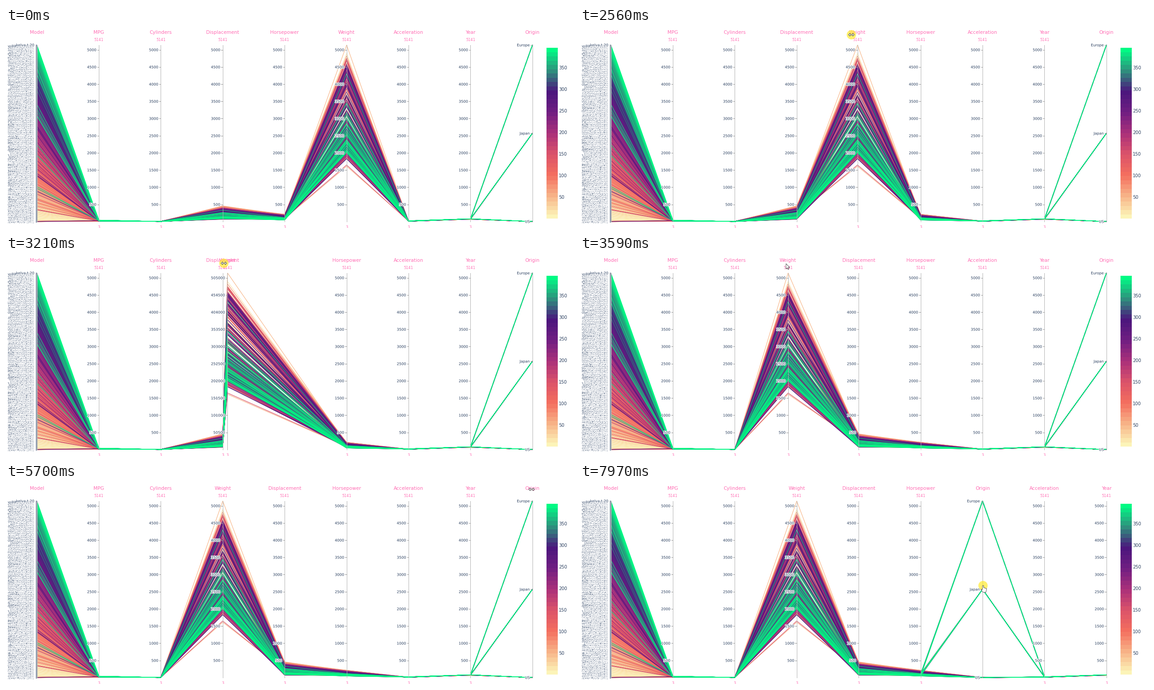
A matplotlib script for the animation above (8000 ms loop, 1260 by 445 pixels).

```python
import numpy as np
import matplotlib.pyplot as plt
from matplotlib.animation import FuncAnimation
from matplotlib.collections import LineCollection
from matplotlib.colors import LinearSegmentedColormap
from matplotlib.patches import Circle, Polygon, Rectangle
from matplotlib.patheffects import withStroke

W, H, DPI = 1260, 445, 100
PX = 72 / DPI
FRAMES, STEP = 200, 40
ROWS, MODELS = 392, 304
LOW, HIGH = 3, 5141
TOP, BOTTOM = 37.8, 430.6
SLOTS = 68.6 + 137.4 * np.arange(9)
NAMES = ["Model", "MPG", "Cylinders", "Displacement", "Horsepower",
         "Weight", "Acceleration", "Year", "Origin"]
FIXED = 3  # the first axes never move
ORIGINS = ["US", "Japan", "Europe"]
PINK, INK, GREY = "#ff6eb4", "#2a3f5f", "#b2b2b2"
CMAP = LinearSegmentedColormap.from_list("sunset", [
    "#fcf4b8", "#f7b287", "#f46e5e", "#da526a", "#aa307a",
    "#701e82", "#4b167d", "#2f8f7d", "#00fa84"], N=512)

# Cursor moves: start time, end time, x, y reached
START = 1214, 447
MOVES = [(100, 500, 880, 335), (500, 910, 764, 36), (1060, 1540, 751, 13),
         (2040, 2080, 733, 17), (2080, 2560, 602, 15), (2560, 2880, 517, 15),
         (2880, 3450, 457, 17), (3600, 4380, 702, 12), (4450, 5090, 1213, 37),
         (5200, 5400, 1166, 12), (5920, 6670, 877, 13), (7000, 7430, 882, 187),
         (7700, 7960, 894, 226)]
# Axis, pressed, released
DRAGS = [("Weight", 1850, 3560), ("Origin", 5920, 7000)]
LAG, SNAP = 33, 80  # an axis trails the cursor, then snaps into its slot

ARROW = np.array([(0, 0), (0, 12), (2.8, 9.4), (4.6, 13.2), (6.2, 12.4),
                  (4.5, 8.8), (8.2, 8.8)])
HEAD = np.array([(-3, 1), (-3, 3.2), (-6.5, 0), (-3, -3.2), (-3, -1)])
SIDEWAYS = np.vstack([HEAD, -HEAD])
HAND = np.array([(-1, 0), (1.3, 0), (1.5, 4.5), (8, 6.8), (6.5, 15), (0, 15),
                 (-4.8, 8), (-1.2, 9)])

rng = np.random.default_rng(8)


def y_of(value):
    return BOTTOM - (np.asarray(value) - LOW) * (BOTTOM - TOP) / (HIGH - LOW)


def make_car(u):
    """Values from MPG to Origin; cars get lighter as u goes from 0 to 1."""
    late = u > .77
    pick, origin = rng.random(), 0
    if pick < (.03 if late else .42):
        cyl = 8
        weight = np.clip(rng.normal(4150, 430), 3350, 5000 - 700 * u - 90 * rng.random())
        disp = (300 + (weight - 3400) * .09 + rng.normal(0, 30)) * (1 - .15 * u)
        disp = np.clip(disp, 260, 455)
        hp = np.clip(disp * (.5 - .12 * u) + rng.normal(0, 15), 110, 225)
        acc, mpg = rng.uniform(8, 16), rng.uniform(9, 19)
    elif pick < .6 - .15 * u * (not late) - .42 * late:
        cyl = 6
        weight = np.clip(rng.normal(3250 - 250 * u, 280), 2500, 3700)
        disp, hp = np.clip(rng.normal(215, 28), 145, 262), rng.normal(98, 9)
        acc, mpg = rng.uniform(12, 20), rng.uniform(16, 28)
    else:
        cyl = 4
        weight = max(rng.normal(2350, 310), 1780 + 160 * late + 150 * rng.random())
        weight = min(weight, 3050)
        disp = np.clip(75 + (weight - 1700) * .065 + rng.normal(0, 12), 68, 156)
        hp = np.clip(rng.normal(78, 14), 46, 115)
        acc, mpg = rng.uniform(13, 24), rng.uniform(20, 33 + 13 * u)
        origin = rng.choice(3, p=[.4, .33, .27])
    return mpg, cyl, disp, hp, weight, acc, 70 + int(12.9 * u), origin


def make_rows():
    """Screen y of every car on every axis; repeated models point back down."""
    repeats = set(rng.choice(np.arange(20, ROWS), ROWS - MODELS, replace=False))
    rows, seen = [], 0
    for i in range(ROWS):
        if i in repeats:
            model = max(0, int(seen - 1 - rng.exponential(70)))
        else:
            model = seen
            seen += 1
        rows.append((model, *make_car(i / (ROWS - 1))))
    rows = np.array(rows, float)
    rows[[43, 52, 144], 5] = HIGH, 1613, 1649  # heaviest and lightest
    rows[:, 0] = LOW + rows[:, 0] / (MODELS - 1) * (HIGH - LOW)
    rows[:, 8] = LOW + rows[:, 8] / 2 * (HIGH - LOW)
    return y_of(rows)


YS = make_rows()
COLORS = CMAP((np.arange(ROWS) + 1) / ROWS)


def make_label():
    parts = ["ba", "dor", "ke", "lun", "mi", "no", "rav", "su", "te", "vo", "gil", "pa"]
    words = ["".join(rng.choice(parts, n)) for n in (2, rng.integers(1, 4))]
    return " ".join(words) + rng.choice(["", " dl", " (sw)", " 120"])


fig = plt.figure(figsize=(W / DPI, H / DPI), dpi=DPI, facecolor="white")
ax = fig.add_axes([0, 0, 1, 1])


def reset():
    ax.clear()
    ax.set(xlim=(0, W), ylim=(H, 0))
    ax.axis("off")


def snapshot():
    fig.canvas.draw()
    return np.array(fig.canvas.buffer_rgba())


def text(x, y, s, size, color=INK, ha="center", halo=False, z=5):
    t = ax.text(x, y + .365 * size, s, size=size * PX, color=color, ha=ha,
                va="baseline", family="DejaVu Sans", zorder=z)
    if halo:
        t.set_path_effects([withStroke(linewidth=2.2 * PX, foreground="white")])


def draw_lines(xs, cols):
    pts = np.empty((ROWS, len(cols), 2))
    pts[..., 0] = xs
    pts[..., 1] = YS[:, cols]
    ax.add_collection(LineCollection(pts, colors=COLORS, linewidths=1.2 * PX,
                                     joinstyle="bevel", zorder=2), autolim=False)


def draw_axis(name, x):
    text(x, 9, name, 10.5, PINK)
    ax.plot([x, x], [TOP, BOTTOM], color=GREY, lw=PX, zorder=4)
    if name == "Model":
        return
    if name == "Origin":
        ticks = zip(ORIGINS, np.linspace(LOW, HIGH, 3))
    else:
        ticks = [(str(v), v) for v in range(500, 5001, 500)]
        text(x, 25.8, str(HIGH), 8.1, PINK)
        text(x, 442.8, str(LOW), 8.1, PINK)
    for label, v in ticks:
        y = y_of(v)
        ax.plot([x - 3.5, x], [y, y], color="#999999", lw=PX, zorder=4)
        text(x - 5.6, y, label, 8.1, ha="right", halo=True)


def draw_colorbar(x=1199, width=24.5, bottom=424, height=380, blocks=40):
    h = height / blocks
    for k in range(blocks):
        ax.add_patch(Rectangle((x, bottom - (k + 1) * h), width, h, lw=0,
                               antialiased=False, color=CMAP(k / (blocks - 1))))
    for v in range(50, 351, 50):
        text(x + 27, bottom + .8 - v * .9625, str(v), 9.9, ha="left")


def draw_base():
    reset()
    draw_lines(SLOTS[:FIXED], range(FIXED))
    for name, x in zip(NAMES[:FIXED], SLOTS):
        draw_axis(name, x)
    ax.plot([67, 67], [TOP, BOTTOM], color="#96a1b1", lw=3 * PX, zorder=4)
    labels = [make_label() for _ in range(MODELS - 1)] + ["kelva t-20"]
    for k, (label, y) in enumerate(zip(labels, np.linspace(BOTTOM, TOP, MODELS))):
        text(63, y, label, 8.1, ha="right", halo=True, z=5 + k / MODELS)
    ax.add_patch(Rectangle((0, 20), 2.5, H, color="white", zorder=7))
    draw_colorbar()


def cursor(t):
    pos = np.array(START, float)
    for start, end, x, y in MOVES:
        pos += np.clip((t - start) / (end - start), 0, 1) * ((x, y) - pos)
    return pos


def layout(t):
    """Moving axes from left to right with their x at time t."""
    order, xs = list(NAMES), SLOTS.copy()
    for name, press, release in DRAGS:
        if t < press:
            continue
        home = SLOTS[order.index(name)]
        x = home + cursor(min(t, release) - LAG)[0] - cursor(press)[0]
        rank = int(np.searchsorted(SLOTS, x - .01))
        order.remove(name)
        order.insert(rank, name)
        if t < release + SNAP:
            xs[rank] = x
    return tuple(order[FIXED:]), tuple(xs[FIXED:])


def draw_pose(order, xs):
    reset()
    cols = [FIXED - 1] + [NAMES.index(n) for n in order]
    draw_lines([SLOTS[FIXED - 1], *xs], cols)
    for name, x in zip(order, xs):
        draw_axis(name, x)


# Each pose of the chart is rendered once; the cursor is drawn live on top.
draw_base()
backdrop = fig.figimage(snapshot(), origin="upper", zorder=-1)
poses = {}
for i in range(FRAMES):
    pose = layout(i * STEP)
    if pose not in poses:
        draw_pose(*pose)
        poses[pose] = snapshot()

reset()
glow = ax.add_patch(Circle((0, 0), 10.3, fc="#ffea30", ec="none", alpha=.7))
pointer = ax.add_patch(Polygon(ARROW, closed=True, fc="white", ec="#333333",
                               lw=.8 * PX, zorder=3))


def update(i):
    t = i * STEP
    backdrop.set_data(poses[layout(t)])
    pos = cursor(t)
    dragging = any(press <= t < release for _, press, release in DRAGS)
    if dragging or 1500 < t < 2000 or 5650 < t < 6000:
        shape = SIDEWAYS
    else:
        shape = HAND if t > 7150 else ARROW
    pointer.set_xy(shape + pos)
    pointer.set_visible(t > 100)
    glow.center = pos
    glow.set_visible(dragging or t > 7940)
    return backdrop, glow, pointer


anim = FuncAnimation(fig, update, frames=FRAMES, interval=STEP, repeat=True,
                     cache_frame_data=False)
plt.show()
```
